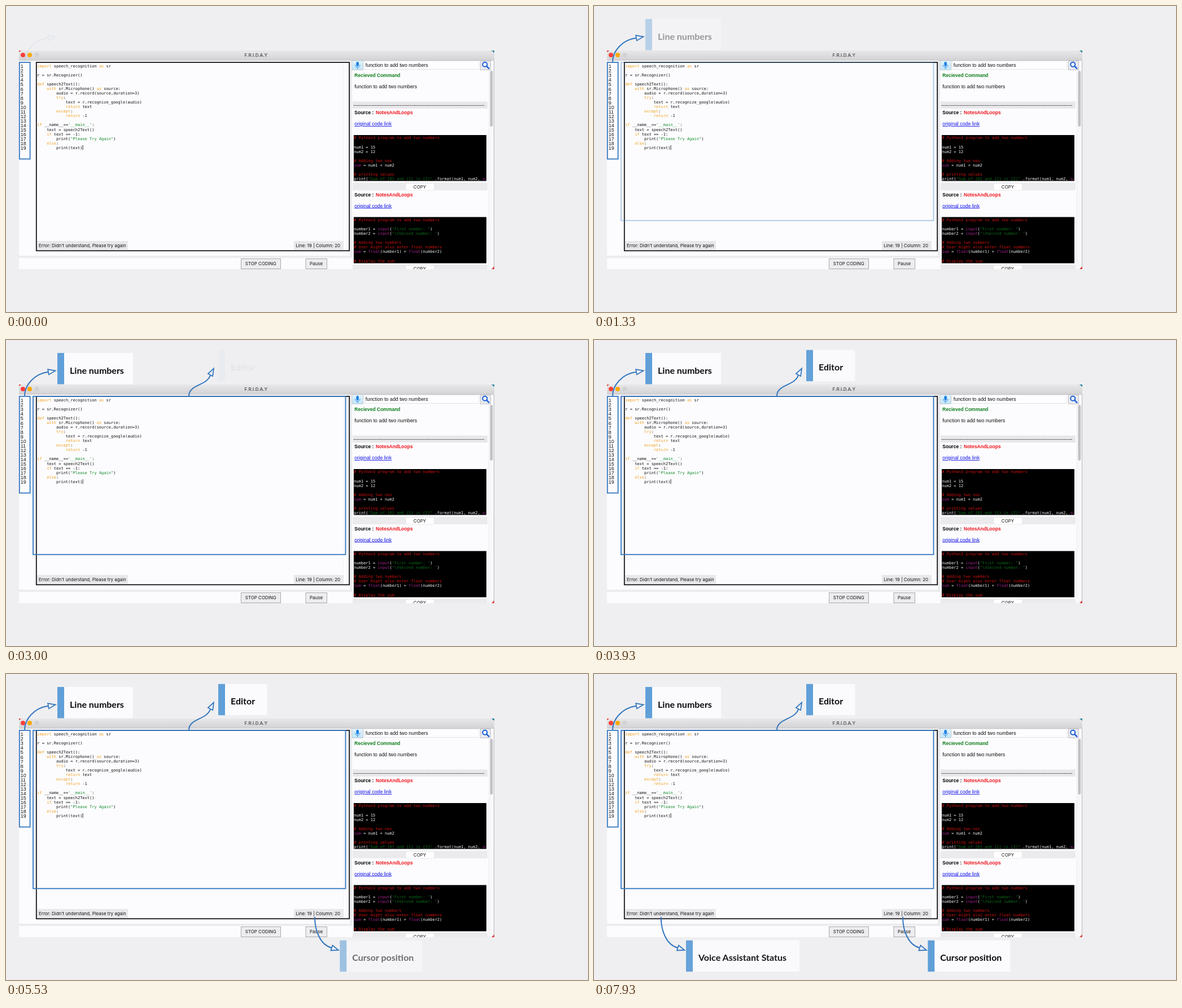
Write an HTML page that moves like this. It is 1031 px wide and 543 px high and loops after 8 s.

```html
<!DOCTYPE html>
<html lang="en">
<head>
<meta charset="utf-8">
<title>Editor overview</title>
<style>
  html, body { margin: 0; width: 100%; height: 100%; overflow: hidden; background: #efeff1; }
  svg { display: block; position: absolute; left: 0; top: 0; }
  text { white-space: pre; }
  .ui { font: 7.95px Inter, sans-serif; fill: #111; }
  .title { font: 600 7.9px Inter, sans-serif; fill: #555; }
  .sans { font: 8.84px "Liberation Sans", Arial, sans-serif; fill: #111; }
  .bold { font: bold 8.5px "Liberation Sans", Arial, sans-serif; }
  .link { fill: #1010e8; text-decoration: underline; }
  .code { font: 7px "DejaVu Sans Mono", monospace; fill: #111; }
  .code .kw { fill: #f0a01e; }
  .code .str { fill: #128a2a; }
  .dark { fill: #f4f4f4; }
  .dark .kw { fill: #a3238e; }
  .dark .str { fill: #0b6b1c; }
  .dark .rem { fill: #d01212; }
  .tag { font: bold 16px Lato, sans-serif; fill: #0c0c10; }
  .line { fill: none; stroke: #3376be; stroke-width: 2; }
  .head { fill: #f6f6fa; stroke: #3376be; stroke-width: 1.8; stroke-linejoin: miter; }
  .btn { fill: #ededf0; stroke: #a9a9ad; stroke-width: 1; }
</style>
</head>
<body>
<svg id="stage" width="1031" height="543" viewBox="0 0 1031 543">
  <defs>
    <linearGradient id="bar" x2="0" y2="1">
      <stop offset="0" stop-color="#e8e7e9"/><stop offset="1" stop-color="#d3d2d4"/>
    </linearGradient>
    <linearGradient id="micBox" x2="0" y2="1">
      <stop offset="0" stop-color="#e4f4fc"/><stop offset="1" stop-color="#bfe4f8"/>
    </linearGradient>
    <clipPath id="win"><rect x="23" y="79" width="842" height="388"/></clipPath>
    <clipPath id="box1"><rect x="616" y="229" width="235" height="81.5"/></clipPath>
    <clipPath id="box2"><rect x="616" y="374.5" width="235" height="82"/></clipPath>
  </defs>
  <g id="app" clip-path="url(#win)"></g>
  <g id="notes"></g>
</svg>
<script>
const LOOP = 8000, FADE = 1000, STEP = 1005, LEAD = -60;
const $ = id => document.getElementById(id);

const rect = (x, y, w, h, fill, extra = '') =>
  `<rect x="${x}" y="${y}" width="${w}" height="${h}" fill="${fill}" ${extra}/>`;
const text = (x, y, cls, s, extra = '') =>
  `<text x="${x}" y="${y}" class="${cls}" ${extra}>${s}</text>`;
const dot = (x, fill) => `<circle cx="${x}" cy="87" r="4" fill="${fill}"/>`;

function code(x, y, pitch, cls, words, src) {
  const re = new RegExp(`(".*?"|'.*?')|(#.*)|\\b(${words})\\b`, 'g');
  return src.split('\n').map((row, i) => text(x, y + i * pitch, cls,
    row.replace(re, (m, str, rem) =>
      `<tspan class="${str ? 'str' : rem ? 'rem' : 'kw'}">${m}</tspan>`))).join('');
}

const program = `import speech_recognition as sr

r = sr.Recognizer()

def speech2Text():
    with sr.Microphone() as source:
        audio = r.record(source,duration=3)
        try:
            text = r.recognize_google(audio)
            return text
        except:
            return -1

if __name__=='__main__':
    text = speech2Text()
    if text == -1:
        print("Please Try Again")
    else:
        print(text)`;

const answer1 = `# Python3 program to add two numbers

num1 = 15
num2 = 12

# Adding two nos
sum = num1 + num2

# printing values
print("Sum of {0} and {1} is {2}" .format(num1, num2, sum))`;

const answer2 = `# Python3 program to add two numbers

number1 = input("First number: ")
number2 = input("\\nSecond number: ")

# Adding two numbers
# User might also enter float numbers
sum = float(number1) + float(number2)

# Display the sum`;

function frame() {
  return rect(23, 79, 842, 388, '#fcfcfe')
    + rect(23, 79, 842, 17, 'url(#bar)')
    + rect(23, 96, 842, 1, '#c9c8ca')
    + '<path d="M23 79h4l-4 3z" fill="#d9413c"/><path d="M860 79h5v4z" fill="#1f7f9a"/>'
    + dot(30, '#fb4038') + dot(42, '#f9a90c') + dot(54.5, '#d2d1d3')
    + text(442.8, 89.8, 'title', 'F.R.I.D.A.Y', 'text-anchor="middle"')
    + rect(609, 97, 4, 350, '#ececef') + rect(23, 443, 590, 4, '#ececef')
    + rect(864, 97, 1, 370, '#b9b9bd');
}

function editor() {
  const nums = Array.from({ length: 19 }, (_, i) => text(25.8, 110.2 + i * 8.06, 'sans', i + 1));
  return nums.join('')
    + rect(53.8, 100, 554.4, 434.3 - 100, '#fcfcfe', 'stroke="#141418" stroke-width="1.8"')
    + rect(597.5, 101, 0.6, 316, '#ececef')
    + code(55.3, 108.7, 8.06, 'code', 'import|as|def|with|try|return|except|if|else', program)
    + rect(135.6, 247, 0.9, 8.3, '#111')
    + rect(55, 417, 161, 15.5, '#e8e8eb')
    + text(58, 427.8, 'ui', "Error: Didn't understand, Please try again")
    + rect(510, 417, 88, 15.5, '#e8e8eb')
    + text(513.3, 427.8, 'ui', 'Line: 19 | Column: 20')
    + rect(416.5, 448.5, 70, 18, '', 'class="btn"')
    + text(451.3, 460, 'ui', 'STOP CODING', 'text-anchor="middle"')
    + rect(531, 448.5, 37.5, 18, '', 'class="btn"')
    + text(549.5, 460, 'ui', 'Pause', 'text-anchor="middle"');
}

function search() {
  return rect(613, 97, 19.5, 16.5, 'url(#micBox)', 'stroke="#c3c6ca" stroke-width=".8"')
    + rect(620.4, 99, 4.6, 8, '#1d7fe0', 'rx="2.3"')
    + '<path d="M618.4 104.5a4.3 4.3 0 0 0 8.6 0M622.7 109v3" fill="none" stroke="#2b8be6"/>'
    + rect(634.5, 97.5, 203.5, 15, '#fdfdff', 'stroke="#dedee2" stroke-width=".8"')
    + text(636.8, 108, 'sans', 'function to add two numbers')
    + rect(840.5, 97.3, 18, 16, '#e9eaf0', 'stroke="#b4b4ba" stroke-width=".8"')
    + '<circle cx="848.3" cy="103.7" r="4" fill="#fff" stroke="#1b5fd6" stroke-width="2"/>'
    + '<path d="M851.4 106.8l4 4" stroke="#1b5fd6" stroke-width="2.4" stroke-linecap="round"/>';
}

function result(y, h, clip, src, first, pitch) {
  const top = y + 40;
  return text(617.3, y + 3.2, 'bold', 'Source :')
    + text(655, y + 3.2, 'bold', 'NotesAndLoops', 'fill="#f0141c"')
    + text(617.3, y + 23, 'sans link', 'original code link')
    + rect(616, top, 235, h, '#000')
    + `<g clip-path="url(#${clip})">${code(616.3, first, pitch, 'code dark', 'sum|input|float', src)}</g>`
    + rect(614, top + 84.5, 239, 13.5, '#ebebee')
    + rect(708, top + 85.5, 50.5, 12.5, '#fff', 'rx="2.5" stroke="#dcdce0" stroke-width=".6"')
    + text(733, top + 94.5, 'ui', 'COPY', 'text-anchor="middle"');
}

function panel() {
  return text(617.3, 126.3, 'bold', 'Recieved Command', 'fill="#0f7f1c"')
    + text(617.3, 146.2, 'sans', 'function to add two numbers')
    + rect(614, 169.5, 239, 12.5, '#e8e8eb')
    + text(615.3, 179, 'sans', '-'.repeat(79))
    + result(189, 81.5, 'box1', answer1, 236.4, 8.06)
    + result(334.5, 82, 'box2', answer2, 382, 8.06)
    + rect(855.5, 114, 8.5, 353, '#f8f8fa')
    + rect(855.3, 114, 0.6, 353, '#e4e4e8')
    + rect(857.5, 115, 4.8, 99, '#c1c1c4', 'rx="2.4"')
    + '<path d="M865 462v5h-5z" fill="#d9413c"/>';
}

// Curved connector with a hollow head from (bx, by) to the tip.
function arrow(path, bx, by, tx, ty) {
  const len = Math.hypot(tx - bx, ty - by);
  const nx = -(ty - by) / len * 4.7, ny = (tx - bx) / len * 4.7;
  return `<path class="line" d="${path}"/>`
    + `<path class="head" d="M${tx} ${ty}L${bx + nx} ${by + ny}L${bx - nx} ${by - ny}Z"/>`;
}

const tag = (x, y, w, s) =>
  rect(x, y, w, 55.5, '#fbfbfe') + rect(x, y, 12, 55.5, '#619fd8')
  + text(x + 22, y + 36.5, 'tag', s);
const outline = (x, y, w, h) => rect(x, y, w, h, 'none', 'stroke="#3376be" stroke-width="1.8"');

const notes = [
  arrow('M33 99C33 80 50 60 75 56.8', 75, 56.8, 87.5, 54.5),
  outline(48, 100, 553.5, 280.7) + tag(91, 23, 134, 'Line numbers'),
  arrow('M324 99C324 79 356 81 362 62.5', 362, 62, 368, 50.5),
  tag(376, 17.7, 86.5, 'Editor'),
  arrow('M547 431C547 456 557 481 577 486', 577, 486, 588.7, 490),
  tag(591.3, 472.7, 146, 'Cursor position'),
  arrow('M118.7 431C118.7 456 128.5 481 148.5 486', 148.5, 486, 160.2, 490),
  tag(163, 472.7, 201, 'Voice Assistant Status')
];

$('app').innerHTML = frame() + editor() + search() + panel();
$('notes').innerHTML = outline(23.8, 100, 18.8, 171.5)
  + notes.map((n, i) => `<g style="animation: show${i} ${LOOP}ms linear infinite">${n}</g>`).join('');

// The notes fade in one after the other and all vanish at the loop point.
const sheet = document.createElement('style');
sheet.textContent = notes.map((_, i) => {
  const start = LEAD + i * STEP, end = Math.min(start + FADE, LOOP);
  const pct = t => (Math.max(t, 0) / LOOP * 100).toFixed(3) + '%';
  const from = Math.max(0, -start / FADE);
  return `@keyframes show${i} { 0%, ${pct(start)} { opacity: ${from} } ${pct(end)}, 100% { opacity: 1 } }`;
}).join('\n');
document.head.append(sheet);
</script>
</body>
</html>
```
